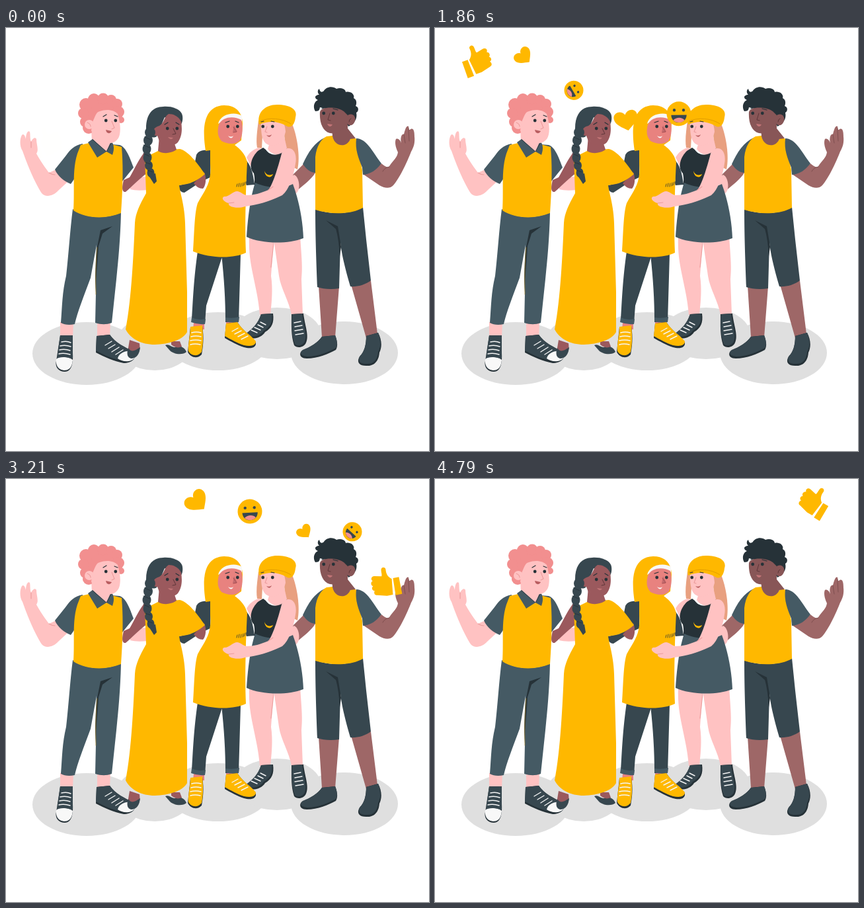
Write an HTML page that moves like this. It is 640 by 640 pixels and loops after 4870 ms.

```html
<!DOCTYPE html>
<html lang="en">
<head>
<meta charset="utf-8">
<title>Friends</title>
<style>
html, body { margin: 0; width: 100%; height: 100%; overflow: hidden; background: #fff; }
svg { display: block; width: 100vw; height: 100vh; }
.y { fill: #ffb800; }
.d { fill: #37474f; }
.s { fill: #455a64; }
.k { fill: #263238; }
.p { fill: #ffc2c2; }
.b { fill: #9e6767; }
.n { fill: #885657; }
.a { fill: #9b595d; }
.h { fill: #f28f8f; }
.r { fill: #e8827f; }
.o { fill: #e8a080; }
.w { fill: #f8f8f8; }
.line { fill: none; stroke-linecap: round; stroke-linejoin: round; }
.lace { stroke: #f5f5f5; stroke-width: 1.4; }
.ink { stroke: #263238; stroke-width: 1.2; }
.thin { stroke: #263238; stroke-width: .8; }
.fold { stroke: #eb9c9c; stroke-width: 1.1; }
</style>
</head>
<body>
<svg viewBox="0 0 640 640">
<defs>
  <path id="heart" class="y" d="M0 10C-5 6-12 2-12-4C-12-11-3-12 0-6C3-12 12-11 12-4C12 2 5 6 0 10Z"/>
  <g id="smile">
    <circle class="y" r="10"/>
    <circle class="d" cx="-3.8" cy="-3" r="1.2"/><circle class="d" cx="3.8" cy="-3" r="1.2"/>
    <path class="d" d="M-6.3 1L6.3 1C6.2 9-6 9.5-6.3 1Z"/>
    <path class="h" d="M-4.6 5.2C-2 2.6 2.5 2.6 4.6 5.2C2.4 7.8-2.4 7.8-4.6 5.2Z"/>
  </g>
  <path id="thumb" class="y" d="M11-6L20-7L23 19L13 20ZM9-5C4-8 1-12 1-20C1-24-6-25-6-19C-6-15-5-13-6-10L-17-11C-22-11-23-6-20-4C-24-2-23 3-20 4C-23 6-22 11-18 11C-20 14-19 18-15 18L0 20L9 19Z"/>
  <g id="eyes"><circle r="2.4" cx="-7.3"/><circle r="2.4" cx="7.3"/></g>
</defs>

<g fill="#dfdfdf">
  <ellipse cx="122" cy="492.500" rx="82" ry="47.500"/><ellipse cx="225" cy="477" rx="58" ry="41"/>
  <ellipse cx="321" cy="474" rx="78" ry="44"/><ellipse cx="410" cy="462" rx="66" ry="39"/>
  <ellipse cx="512" cy="491.500" rx="81" ry="47.500"/>
</g>

<!-- curly hair, polo shirt -->
<g>
  <path class="p" d="M186 226L214 225V245C204 246 195 246 188 244Z"/>
  <path class="p" d="M25 186C20 178 21 167 24 162C27 159 29 164 30 168C30 160 33 154 36 157C37 161 36 168 38 172C40 167 44 164 46 168C46 177 50 184 46 190C53 203 60 212 65 219L76 214L93 233L79 246C72 254 60 257 54 250C46 238 34 212 25 186Z"/>
  <path class="line fold" d="M65 219Q70 222 74 222M38 172V181"/>
  <path class="s" d="M116 175C104 177 97 184 90 194L74 214C78 224 88 232 98 236L112 216ZM160 176L172 177C182 180 188 198 193 211L176 232Z"/>
  <path class="p" d="M82 445H102L101 468H82ZM138 445H158L157 468H138Z"/>
  <path class="s" d="M101 274C120 288 150 290 174 279C173 320 170 350 167 380L160 446C152 449 144 449 135 446L136 400C134 380 136 350 137 328L128 378C118 405 108 430 104 448C96 450 88 449 83 446C85 420 85 400 91 375C95 340 97 305 101 274Z"/>
  <path class="k" d="M161 300L143 306L138 331C137 350 135 370 135 390C137 370 139 350 140 330L146 311Z"/>
  <path class="line" stroke="#9f7b22" stroke-width=".7" d="M138 332Q135 360 136 403"/>
  <path class="y" d="M113 177L130 173L160 176L175 180C178 215 176 250 174 280C150 290 120 288 102 276C104 240 100 215 108 190Z"/>
  <path class="p" d="M129 154L160 172L157 179L152 188L130 171Z"/>
  <path class="s" d="M124 173L131 168L152 187L138 196ZM152 187L159 171C164 176 164 184 161 192Z"/>
  <path class="line thin" d="M131 169L152 187L159 174"/>
  <g class="h">
    <ellipse cx="140" cy="127" rx="27" ry="22"/>
    <circle cx="121" cy="116" r="10"/><circle cx="133" cy="108" r="9"/><circle cx="147" cy="107" r="8.500"/>
    <circle cx="159" cy="109" r="8"/><circle cx="168" cy="115" r="8"/><circle cx="170" cy="127" r="9"/>
    <circle cx="174" cy="139" r="5"/><circle cx="117" cy="129" r="8"/><circle cx="120" cy="142" r="8"/><circle cx="125" cy="151" r="9"/>
  </g>
  <path class="p" d="M131 142C135 134 136 127 142 126C152 122 164 124 169 130C172 140 174 152 172 161C170 172 160 176 150 174C139 171 132 165 129 155Z"/>
  <circle class="p" cx="126" cy="146" r="7"/>
  <path class="line fold" d="M123 143Q128 145 128 149M160 141L164 151L160 153"/>
  <use href="#eyes" class="k" x="158.500" y="140"/>
  <path class="line ink" d="M147 134L152 131M164 132L169 134"/>
  <path fill="#b95e60" d="M151 154L160 156C157 161 152 160 151 154Z"/>
  <path class="k" d="M82 465H101L101 492C102 510 98 520 89 520C78 520 74 511 76 504Z"/>
  <path class="d" d="M82 465H101V500L77 502Z"/>
  <path class="w" d="M76 501C82 496 96 498 101 502C100 514 95 518 88 518C79 517 75 511 76 501Z"/>
  <path class="line lace" d="M84 475Q92 473 98 476M82 481Q90 479 98 482M81 487Q89 485 97 488M80 493Q88 491 97 494"/>
  <path class="k" d="M137 466L157 464C165 476 180 483 194 490C199 500 190 507 178 507C163 504 149 498 136 491Z"/>
  <path class="d" d="M137 466L157 464C165 476 178 482 188 488L170 502C158 499 147 494 136 488Z"/>
  <path class="w" d="M169 500C171 492 180 488 188 489C198 491 198 502 186 504C179 505 173 503 169 500Z"/>
  <path class="line lace" d="M150 480L160 474M155 485L165 479M160 490L171 483M166 494L177 487"/>
</g>

<!-- short hair, yellow tee -->
<g>
  <path class="b" d="M450 206L468 219C462 229 450 238 440 246L434 222Z"/>
  <path class="s" d="M482 166C467 173 457 188 449 206C455 214 461 219 468 219L475 195Z"/>
  <path class="b" d="M557 214L568 205C574 210 578 212 580 209C586 200 592 196 593 188C589 180 588 172 590 168C594 166 597 171 598 174C596 166 599 159 602 161C604 153 606 147 609 149C610 153 609 154 611 154C616 150 618 155 618 164C619 174 617 180 613 187C606 205 595 228 586 238C580 244 572 242 565 238L540 221Z"/>
  <path class="line" stroke="#7f4f50" d="M580 210Q573 211 570 217M602 161L604 174M609 152L610 171"/>
  <path class="b" d="M473 390L504 391L498 468H478ZM522 388L552 382L562 463L545 469Z"/>
  <path class="d" d="M468 274C490 283 520 282 540 271L545 320L552 382C543 389 530 392 521 391C515 370 508 345 506 325L504 394C492 396 480 395 471 392C470 365 468 320 468 274Z"/>
  <path class="k" d="M484 291L502 300L507 331L505 345C504 325 501 310 499 304Z"/>
  <path class="y" d="M485 164L494 163C498 181 517 180 522 166L532 168C530 185 537 200 539 215L540 272C520 283 490 282 468 275L468 195C470 178 477 168 485 164Z"/>
  <path class="s" d="M530 167C546 168 553 185 568 205C560 215 552 221 540 222L539 211C533 196 528 184 530 167Z"/>
  <path class="n" d="M493 150L517 137V152L529 167L521 168C516 181 498 181 494 164Z"/>
  <path class="k" d="M468 126C463 118 468 110 472 109C465 106 468 101 474 101C471 98 471 94 474 92C475 97 478 98 481 95C484 89 494 87 500 92C507 89 514 93 514 97C522 95 528 101 526 106C532 109 530 116 529 118C535 120 533 127 530 128C532 138 527 144 518 149C514 141 516 132 512 129L475 120C474 127 471 125 468 126Z"/>
  <path class="n" d="M475 127C477 118 502 119 511 126L517 132L515 147C508 157 500 161 490 159C479 156 474 143 475 127Z"/>
  <path class="n" d="M515 134C522 126 532 133 527 143C523 150 516 147 515 142Z"/>
  <path class="line" stroke="#5e3639" d="M490 129L487 139L491 140M522 137Q519 138 519 142"/>
  <use href="#eyes" class="k" x="488" y="129"/>
  <path class="line ink" d="M478 122L483 120M495 122L502 124"/>
  <path fill="#c17476" d="M486 145L494 146C492 150 488 150 486 145Z"/>
  <path class="k" d="M478 467L498 465C502 475 502 482 499 487C488 493 472 500 455 500C444 500 443 492 448 488C460 483 472 476 478 467ZM545 466L563 461C569 472 569 483 565 491C564 505 556 512 545 511C532 511 531 504 535 497C542 490 545 480 545 466Z"/>
  <path class="d" d="M478 467L498 465C501 473 502 479 499 484C488 490 472 497 456 497C445 496 444 491 449 487C460 483 472 476 478 467ZM545 466L563 461C567 472 568 481 563 490C562 503 555 509 545 508C534 508 532 502 536 496C542 490 545 480 545 466Z"/>
</g>

<!-- beanie -->
<g>
  <path class="o" d="M382 140C380 156 378 170 380 181L387 182L389 143ZM420 145L432 143C440 160 446 195 441 214L424 205Z"/>
  <path class="p" d="M436 222C445 226 447 250 436 251C428 249 430 236 428 228ZM382 181L392 186L372 212L364 196C368 188 374 184 382 181Z"/>
  <path class="d" d="M361 198C370 205 374 220 376 237L364 238Z"/>
  <path class="p" d="M368 314L405 322L401 375C404 395 402 415 400 434H384C382 410 378 395 374 375C370 355 367 340 368 314ZM405 320L445 314C447 345 449 360 447 380L449 434H432C428 412 416 395 413 375Z"/>
  <path class="line fold" d="M405 325L401 362"/>
  <path class="p" d="M400 170L420 160L425 182C427 194 405 197 396 183Z"/>
  <path class="k" d="M389 181L381 186C372 195 366 210 375 220C377 230 376 234 375 237C395 245 420 244 429 236L432 205L425 182C416 194 400 195 393 184Z"/>
  <path class="s" d="M377 234C395 243 420 243 434 236C443 260 449 290 450 318C425 328 385 326 364 316C366 285 370 255 377 234Z"/>
  <path class="y" d="M391 216C393 222 398 224 404 221C402 228 392 227 391 216Z"/>
  <path class="p" d="M386 140C395 136 418 138 426 143C432 147 429 158 423 157C420 170 413 178 403 178C390 177 385 168 386 140Z"/>
  <path class="o" d="M421 146H430C438 160 441 172 438 186L428 181C421 168 425 158 421 146Z"/>
  <path class="y" d="M383 146C379 128 392 116 410 116C429 116 442 123 438 135C437 145 432 153 424 148C410 140 396 141 383 146Z"/>
  <path class="line" stroke="#e39e00" d="M384 141C397 135 418 136 431 145"/>
  <use href="#eyes" class="k" x="396" y="149"/>
  <path class="line ink" d="M386 142L390 141M401 141L406 142"/>
  <path class="line fold" d="M395 149L392 157L395 158"/>
  <path fill="#b95e60" d="M394 162Q399 164 402 161Q399 168 394 162Z"/>
  <path class="k" d="M386 433L404 432C406 446 402 454 392 460C386 470 370 473 361 465C373 455 381 448 386 433ZM432 433L450 432C452 450 459 465 454 476C451 484 440 485 436 480C431 465 432 450 432 433Z"/>
  <path class="d" d="M386 433L402 432C404 445 400 452 390 458C384 467 370 470 362 463C373 455 381 448 386 433ZM433 433L448 432C450 450 456 464 452 474C449 481 440 482 437 478C432 465 432 450 433 433Z"/>
  <path class="line lace" d="M385 445L393 449M381 449L389 453M376 453L385 457M371 457L380 461M436 446L446 444M437 452L448 450M437 458L449 456M438 464L450 462"/>
</g>

<!-- headscarf -->
<g>
  <path class="d" d="M288 192C291 185 300 184 310 185L309 226L296 232L270 249C264 249 260 243 262 238L280 234Z"/>
  <path class="r" d="M284 446H300V456H283ZM333 443H350V452H333Z"/>
  <path class="d" d="M290 338L328 343L303 420L301 447L281 443C283 410 284 380 290 338ZM326 342L355 342L352 445H332C332 410 330 380 326 342Z"/>
  <path class="s" d="M281 438Q291 443 302 440L301 448Q290 449 280 445ZM332 438Q343 440 353 437L352 445Q341 447 332 444Z"/>
  <path class="y" d="M302 186C298 160 295 118 330 117C350 117 358 130 358 145L356 170L346 177C354 183 362 190 365 203C363 240 361 300 363 340C345 349 310 349 283 338C285 310 285 280 290 265C300 246 312 235 309 205L309 185Z"/>
  <path class="w" d="M321 145C324 129 348 126 357 133V141L326 142Z"/>
  <path class="r" d="M322 146C328 133 346 133 356 139C359 150 358 163 354 170C347 178 333 175 326 171C319 163 320 155 322 146Z"/>
  <path class="line" stroke="#a6484d" d="M344 150L349 157L344 158"/>
  <path fill="#a6575e" opacity=".55" d="M345 147L350 157L343 158Z"/>
  <use href="#eyes" class="k" x="343" y="149"/>
  <path class="line ink" d="M332 143L338 141M347 141L352 143"/>
  <path class="w" d="M336 163Q341 166 344 163Q341 170 336 163Z"/>
  <path class="line thin" d="M349 240L350 236M352 240L353 235M355 240L356 235M358 239L359 234M360 238L362 233M363 237L364 232"/>
  <path class="k" d="M279 453L297 451C300 470 298 482 296 494C290 501 279 499 275 490ZM333 447L350 445C358 458 370 465 378 476C379 484 370 486 360 483C350 480 340 474 331 469Z"/>
  <path class="y" d="M279 452L297 450C299 470 298 480 296 490C290 498 280 496 276 489C275 478 279 465 279 452ZM333 447L350 445C358 458 370 464 378 474C378 481 370 482 360 480C350 477 340 471 331 466Z"/>
  <path class="line lace" d="M281 461Q288 459 295 461M280 467Q287 465 295 467M279 473Q287 471 295 473M279 479Q286 477 294 479M342 459L351 454M346 463L356 458M351 467L361 462M356 471L366 466"/>
</g>
<path class="p" d="M427 182C438 182 440 195 438 205C435 225 428 245 418 253C400 262 380 268 362 270C350 274 335 271 337 265C329 263 325 257 330 255C337 256 343 247 350 247C356 248 358 252 364 253C375 253 385 250 397 245C405 235 413 205 417 190C419 184 423 182 427 182Z"/>
<path class="line fold" d="M337 265L345 264M397 245L404 240"/>

<!-- braid, long dress -->
<g>
  <path class="a" d="M211 186L216 194V218C203 226 191 240 181 248C174 249 176 238 178 230L187 226C195 213 200 199 211 186ZM284 235L300 218C304 228 302 239 298 243C292 243 288 240 284 235Z"/>
  <path class="a" d="M187 472L202 477C204 490 199 496 191 497L184 490Z"/>
  <path class="d" d="M185 484C190 493 198 486 203 483C202 493 198 500 189 500C182 498 183 490 185 484ZM241 480C246 477 250 483 256 483C262 478 271 484 273 490C268 495 254 494 248 488Z"/>
  <path class="a" d="M250 474H263L266 482Q258 486 250 479Z"/>
  <path class="y" d="M230 186L263 183C276 186 290 205 301 221C292 229 280 236 268 237L262 238C264 252 270 268 271 295L274 400V460C268 472 245 479 225 479C205 479 188 470 181 456C190 410 193 340 195 295C196 278 205 263 212 250L210 196Z"/>
  <path class="a" d="M232 164L254 172L258 184C250 190 238 191 230 186Z"/>
  <path class="d" d="M212 152C212 130 222 119 238 119C252 118 266 123 267 133C268 140 266 146 263 148L240 135L228 164C222 168 212 164 212 152Z"/>
  <path class="a" d="M232 148C240 143 239 134 246 130C256 130 263 136 265 142C267 154 266 165 260 173C253 180 240 178 232 171L229 163C218 164 220 151 232 148Z"/>
  <g class="d">
    <ellipse cx="218" cy="158" rx="8" ry="8"/><ellipse cx="215" cy="170" rx="7" ry="8"/><ellipse cx="213" cy="183" rx="6.500" ry="8"/>
    <ellipse cx="214" cy="196" rx="6.500" ry="8"/><ellipse cx="216" cy="208" rx="6" ry="7"/><ellipse cx="219" cy="219" rx="5.500" ry="7"/>
    <path d="M215 222L226 220L228 232L224 236Z"/>
  </g>
  <path class="line thin" d="M210 165L219 169M208 177L217 181M208 190L217 194M210 203L219 206M214 215L222 218"/>
  <use href="#eyes" class="k" x="251.500" y="152"/>
  <path class="line ink" d="M240 146L245 143M257 143L262 146"/>
  <path class="line" stroke="#5e3639" d="M253 152L257 160L252 161"/>
  <path fill="#c17476" d="M245 165L253 166Q249 171 245 165Z"/>
</g>

<g id="icons"></g>
</svg>
<script>
const LOOP = 4870, RISE = 2400, FADE = 240;
// turn: pairs of [progress, degrees]
const swing = [[0, 22], [.2, -4], [.36, -22], [.49, -36], [.6, -22], [.775, 26], [.87, 38], [1, 34]];
const mirror = swing.map(([p, a]) => [p, -a]);
const roll = [[0, 8], [.108, -6], [.375, 43], [.458, 60], [.55, 48], [.646, 31], [.754, 9], [.88, -14], [1, -20]];
const icons = [
  { id: 'thumb', x: 62, from: 173, to: 32, start: 0, size: 1, flip: true, turn: mirror },
  { id: 'heart', x: 134.5, from: 112, to: 11, start: 380, size: 1.17, turn: [[0, 5], [.2, -22], [.45, -48], [.62, -45], [.91, 15], [1, 22]] },
  { id: 'smile', x: 210, from: 156.6, to: 13.6, start: 760, size: 1.45, turn: roll },
  { id: 'heart', x: 289.5, from: 162, to: 24, start: 1240, size: 1.5, turn: [[0, -35], [.258, -12], [.45, 16], [.554, 18], [.82, -43], [1, -50]] },
  { id: 'smile', x: 369, from: 133, to: 22, start: 1600, size: 1.85, turn: [[0, 12], [.108, 0], [.35, -28], [.42, -28], [.67, -3], [.94, 42], [1, 45]] },
  { id: 'heart', x: 452, from: 139, to: 41, start: 1860, size: .97, turn: [[0, 0], [.296, -33], [.43, -44], [.5625, -37], [.833, 0], [1, 15]] },
  { id: 'smile', x: 524, from: 107.5, to: 18, start: 2310, size: 1.45, turn: roll },
  { id: 'thumb', x: 575, from: 171, to: 28, start: 2720, size: 1, turn: swing }
];

const layer = document.getElementById('icons');
for (const icon of icons) {
  icon.el = document.createElementNS('http://www.w3.org/2000/svg', 'use');
  icon.el.setAttribute('href', '#' + icon.id);
  layer.append(icon.el);
}

function angleAt(keys, p) {
  const i = Math.max(1, keys.findIndex(k => k[0] >= p));
  const [p0, a0] = keys[i - 1], [p1, a1] = keys[i];
  return a0 + (a1 - a0) * (p - p0) / (p1 - p0);
}

function draw(now) {
  const t = now % LOOP;
  for (const { el, x, from, to, start, size, flip, turn } of icons) {
    const age = t - start, p = age / RISE;
    const alive = p > 0 && p < 1;
    el.style.display = alive ? '' : 'none';
    if (!alive) continue;
    const y = from + (to - from) * (1 - Math.cos(Math.PI * p)) / 2;
    el.setAttribute('opacity', Math.min(1, age / FADE, (RISE - age) / FADE));
    el.setAttribute('transform',
      `translate(${x} ${y}) rotate(${angleAt(turn, p)}) scale(${flip ? -size : size} ${size})`);
  }
}

const begin = performance.now();
function tick() {
  draw(performance.now() - begin);
  requestAnimationFrame(tick);
}
tick();
</script>
</body>
</html>
```
